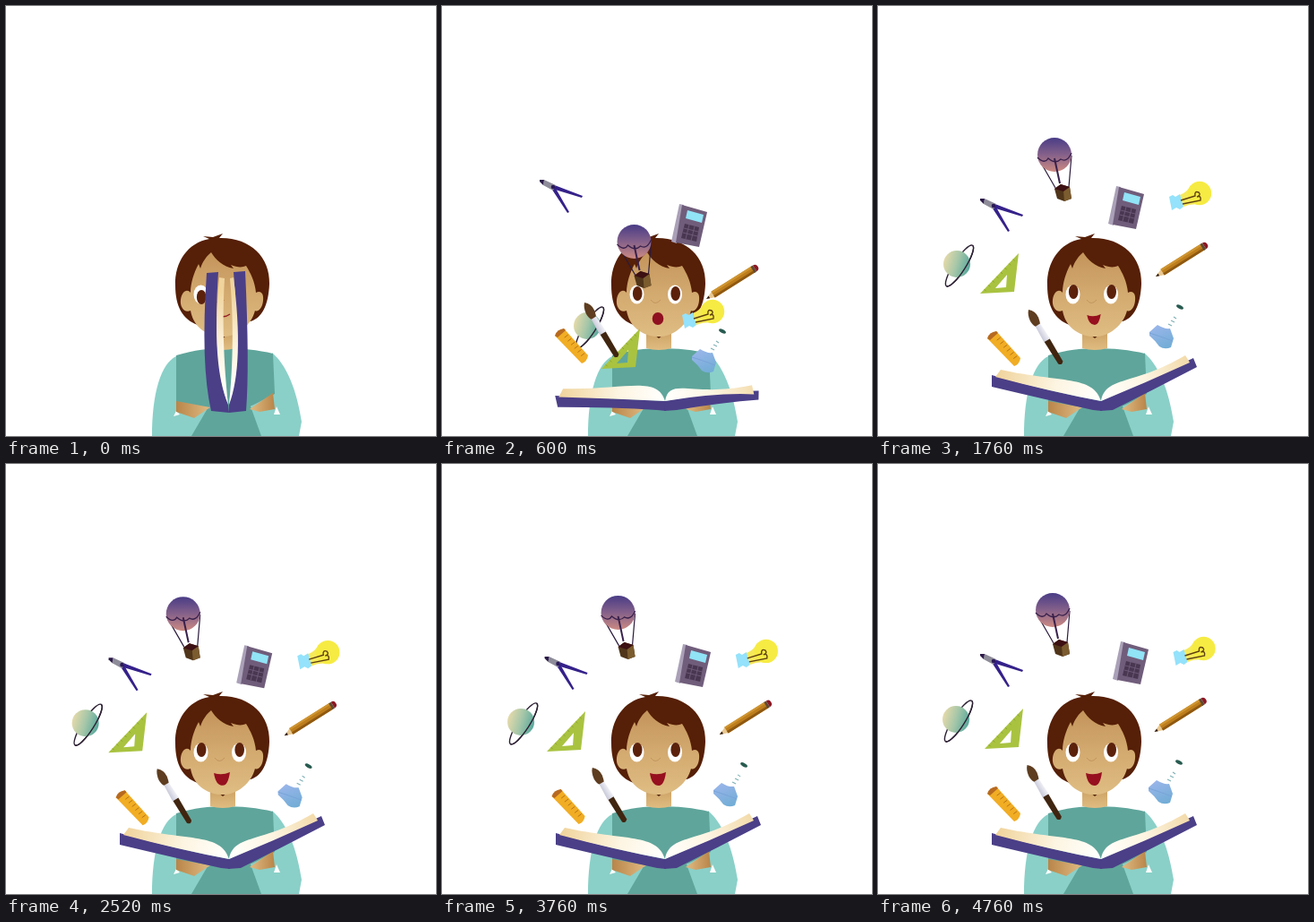
Animation, 480 px wide and 480 px high, one loop 4.8 s. Source, as an HTML page with a canvas:

```html
<!DOCTYPE html>
<html lang="en">
<head>
<meta charset="utf-8">
<title>Reading child</title>
<style>
html, body { margin: 0; width: 100%; height: 100%; overflow: hidden; background: #fff; }
canvas { display: block; width: 100vw; height: 100vh; }
</style>
</head>
<body>
<canvas id="stage" width="480" height="480"></canvas>
<script>
const ctx = document.getElementById('stage').getContext('2d');
const LOOP = 4800, STEP = 40;
const clamp = v => Math.max(0, Math.min(1, v));
const lerp = (a, b, k) => a + (b - a) * k;
const ease = v => { v = clamp(v); return v * v * (3 - 2 * v); };

function fill(path, color) {
  ctx.fillStyle = color;
  ctx.fill(new Path2D(path), 'evenodd');
}
function line(path, color, width = 1) {
  ctx.strokeStyle = color;
  ctx.lineWidth = width;
  ctx.stroke(new Path2D(path));
}
function oval(x, y, rx, ry, color, turn = 0) {
  ctx.beginPath();
  ctx.ellipse(x, y, rx, ry, turn, 0, 7);
  ctx.fillStyle = color;
  ctx.fill();
}
function blend(x0, y0, x1, y1, ...colors) {
  const g = ctx.createLinearGradient(x0, y0, x1, y1);
  colors.forEach((c, i) => g.addColorStop(i / (colors.length - 1), c));
  return g;
}
function turned(x, y, angle, draw) {
  ctx.save();
  ctx.translate(x, y);
  ctx.rotate(angle);
  draw();
  ctx.restore();
}

// Cubic curve through [time, value] pairs, flat at both ends.
function curve(keys, t) {
  const last = keys.length - 1;
  if (t <= keys[0][0]) return keys[0][1];
  if (t >= keys[last][0]) return keys[last][1];
  const i = keys.findIndex(k => k[0] > t) - 1;
  const slope = n => n <= 0 || n >= last ? 0
    : (keys[n + 1][1] - keys[n - 1][1]) / (keys[n + 1][0] - keys[n - 1][0]);
  const [t0, a] = keys[i], [t1, b] = keys[i + 1];
  const d = t1 - t0, u = (t - t0) / d, v = 1 - u;
  return v * v * (1 + 2 * u) * a + u * u * (3 - 2 * u) * b
    + d * u * v * (v * slope(i) - u * slope(i + 1));
}

// ---- child ----
function drawChild(t) {
  fill('M190 391C173 399 163 432 163 480H212L228 448L194 440Z', '#8ad0c8');
  fill('M297 387C317 404 326 438 330 464L327 480H281L272 448L299 430Z', '#8ad0c8');
  fill('M190 390C210 384 228 382 242 382C262 382 282 384 298 388L300 433L273 447L285 480H207L224 451L190 442Z', '#5fa59b');
  fill('M187 458L190 452L194 456ZM299 456L302 447L306 456Z', '#fff');
  fill('M190 441L228 448L210 460L190 453Z', blend(190, 0, 228, 0, '#b98549', '#e0bb83'));
  fill('M272 450L298 432L300 450L283 453Z', blend(272, 0, 300, 0, '#e0bb83', '#b98549'));
  fill('M228 358H256V382Q242 386 228 382Z', blend(0, 360, 0, 383, '#c99d60', '#dfbb80'));
  fill('M237 367H247L242 371Z', '#55260d');

  fill('M189 312C188 286 203 264 227 260L220 257L231 258L242 254L238 259C272 258 295 280 294 310C293 334 286 348 273 352L214 356C197 350 189 335 189 312Z', '#561f07');
  fill('M206 320C206 309 210 297 215 288L217 293C219 286 224 279 229 275C234 283 242 291 254 293L251 289C258 292 264 292 268 290C273 298 278 308 279 320C285 317 288 322 287 329C286 338 281 342 278 340C274 356 258 370 240 369C222 368 209 357 206 340C199 343 194 336 195 328C196 319 202 315 206 320Z',
    blend(0, 276, 0, 369, '#c4955c', '#d3aa70', '#dfbd83'));

  const lookY = curve([[0, 325], [420, 324], [600, 321], [800, 319]], t);
  for (const x of [217.5, 260]) {
    oval(x, 322, 8, 10.5, '#fff');
    oval(x + .7, lookY, 5.3, 8, '#5b210b');
  }
  line('M233 328Q238 335 244 328', '#bd9058', .8);

  if (t < 400) {
    line('M236 345Q243 349 250 344', '#921b24', 1.4);
  } else if (t < 1280) {
    const open = ease((t - 360) / 160);
    oval(241, 349, 6.3, 7 * open, '#8f1020');
  } else {
    const grow = ease((t - 1280) / 1400);
    const w = lerp(7.2, 9, grow), low = lerp(355, 359, grow);
    fill(`M${241 - w} 345Q241 348 ${241 + w} 344Q${239 + w} ${low} 242 ${low}Q${243 - w} ${low} ${241 - w} 345Z`, '#96101f');
  }
}

// ---- book: points swing around the spine, those next to it slide ----
const SPINE = [249, 446];
function swing(side, k, [cx, cy, ox, oy]) {
  const polar = (x, y) => [Math.hypot(x - SPINE[0], y - SPINE[1]),
    Math.atan2(SPINE[1] - y, (x - SPINE[0]) * side)];
  const [r0, a0] = polar(cx, cy), [r1, a1] = polar(ox, oy);
  if (r1 < 40) return [lerp(cx, ox, clamp(k)), lerp(cy, oy, clamp(k))];
  const r = lerp(r0, r1, k), a = lerp(a0, a1, k);
  return [SPINE[0] + side * r * Math.cos(a), SPINE[1] - r * Math.sin(a)];
}
// Each point: closed x, y, open x, y.
const HALVES = [
  { side: -1, over: 1.15,
    cover: [[237, 297, 127, 412], [224, 298, 127, 425], [217, 400, 190, 440], [229, 452, 240, 451],
      [249, 454, 250, 452], [248, 445, 249, 441], [230, 400, 195, 431]],
    page: [[244, 304, 137, 406], [238, 303, 131, 414], [229, 400, 195, 431], [248, 445, 249, 441],
      [246, 425, 240, 412], [240, 370, 205, 421]] },
  { side: 1, over: 1.3,
    cover: [[254, 297, 352, 393], [267, 296, 356, 403], [272, 400, 308, 428], [268, 452, 262, 451],
      [249, 454, 248, 452], [249, 445, 249, 441], [262, 400, 302, 417]],
    page: [[250, 304, 343, 390], [254, 303, 348, 398], [266, 400, 300, 420], [249, 445, 249, 441],
      [251, 425, 254, 413], [256, 370, 285, 424]] }
];
function drawBook(t) {
  const paper = ctx.createRadialGradient(249, 436, 8, 249, 436, 118);
  paper.addColorStop(0, '#fffefa');
  paper.addColorStop(.4, '#fdf5e2');
  paper.addColorStop(1, '#f0d49d');
  const shapes = HALVES.map(h => {
    const k = t < 600 ? h.over * ease(t / 580) : lerp(h.over, 1, ease((t - 600) / 280));
    const place = p => swing(h.side, k, p).map(v => v.toFixed(2)).join(' ');
    return { c: h.cover.map(place), p: h.page.map(place) };
  });
  for (const { c } of shapes)
    fill(`M${c[0]}L${c[1]}Q${c[2]} ${c[3]}L${c[4]}L${c[5]}Q${c[6]} ${c[0]}Z`, '#4b3f88');
  for (const { p } of shapes)
    fill(`M${p[0]}L${p[1]}Q${p[2]} ${p[3]}C${p[4]} ${p[5]} ${p[0]}Z`, paper);
}

// ---- flying things, drawn at their resting places ----
function balloon() {
  line('M179 170L198 203M216 167L213 202', '#2b1b3d', 1.2);
  oval(197, 166, 19, 19, blend(0, 147, 0, 185, '#493c86', '#85618a', '#cc8a82'));
  line('M178 169Q186 177 190 170Q198 177 204 171Q211 175 216 164', '#38204c', 1.3);
  line('M197 170L203 198', '#38204c', 2);
  fill('M197 204L204 199L214 202L216 215L208 218L200 215Z', '#50351a');
  fill('M207 206L214 202L216 215L208 218Z', '#7b5c2f');
  fill('M197 204L204 199L214 202L207 207Z', '#3d1013');
}
function calculator() {
  fill('M266 201L271 202L263 245L257 243Z', '#aaa0b7');
  fill('M269 202L297 210L288 249L262 244Z', '#705d7b');
  fill('M275 208L293 213L291 222L273 217Z', '#91e3f6');
  fill('M272 223L288 227L285 243L268 239Z', '#493651');
  line('M277 224L273 240M283 226L279 242M271 228L287 232M270 233L286 237', '#705d7b', .9);
}
function bulb() {
  fill('M337 211Q345 208 349 200L361 222Q350 220 341 224Z', '#f6e95a');
  oval(359, 209, 13.2, 13.2, '#f6eb43');
  fill('M325 213L329 211L332 213L337 210L341 224L337 227L333 225L328 228Z', '#94e2fb');
  line('M338 217L354 212Q353 206 358 208Q361 211 356 213Q361 211 360 217L340 221', '#5e3f12', 1.4);
}
function pencil() {
  turned(310, 302, -.562, () => {
    fill('M0 0L10 -4V4Z', '#e9c891');
    fill('M0 0L4 -1.6V1.6Z', '#2d1a10');
    fill('M9 -4H62V4H9Z', '#bd7d1c');
    fill('M9 1.2H62V4H9Z', '#8f5911');
    fill('M9 -4H62V-1.8H9Z', '#cf9531');
    fill('M61 -4H64V4H61Z', '#5f4a32');
    fill('M64 -4Q68 -4 68 0Q68 4 64 4Z', '#8b1723');
  });
}
function flask() {
  fill('M303 364L312 356Q320 361 326 360L330 371L327 381Q320 384 314 380Q309 373 303 368Z',
    blend(312, 357, 322, 382, '#98b5e9', '#72add6'));
  line('M303 365Q313 368 329 374', '#79a4d8', 1);
  line('M324 355L328 357M327 351L331 353M330 347L333 349', '#7fb1b5', 1.1);
  oval(337, 336, 4.3, 2, '#285b50', .5);
}
function compass() {
  fill('M128 220L162 233L161 235L128 225Z', '#35218a');
  fill('M126 223L131 223L147 251L145 252Z', '#35218a');
  fill('M119 215L132 221L129 227L118 221Z', '#8d8c98');
  fill('M114 215L119 215L118 221L114 217Z', '#2b1a48');
  oval(129, 223, 2.3, 2.3, '#2b1a58');
}
function planet() {
  const ring = (from, to) => {
    ctx.beginPath();
    ctx.ellipse(91, 290, 27, 6.5, -1, from, to);
    ctx.strokeStyle = '#2c2033';
    ctx.lineWidth = 1.4;
    ctx.stroke();
  };
  ring(0, 7);
  oval(88, 288, 15, 15, blend(74, 284, 102, 292, '#e2d9aa', '#a5c6a8', '#5ba99d'));
  ring(0, Math.PI);
}
function triangle() {
  fill('M114 321L157 276L152 319ZM131 315L144 300L143 314Z', '#a9c340');
  let ticks = '';
  for (let i = 1; i < 9; i++) ticks += `M${114 + i * 4.6} ${321 - i * 4.8}l2 2`;
  line(ticks, '#839c2a', .8);
}
function ruler() {
  fill('M122 371L132 363L159 393Q158 400 152 402Z', '#f1ad24');
  fill('M122 371Q124 364 132 363L134 365L125 373Z', '#b76a20');
  let ticks = '';
  for (let i = 1; i < 7; i++) ticks += `M${133 + i * 3.7} ${366 + i * 4.1}l-4 3`;
  line(ticks, '#b87516', 1);
}
function brush() {
  turned(168, 339, 1.026, () => {
    fill('M39 -3.5L69 -3Q73 0 69 3L39 3.5Z', '#402510');
    fill('M18 -3L40 -4V4L18 3Z', blend(0, -4, 0, 4, '#f2f2f7', '#c7c8d8'));
    fill('M0 0Q5 -6 13 -5Q18 -4 20 -3V3Q18 5 12 5Q4 4 0 0Z', '#5e3d20');
  });
}

// [drawing, launch time, early x, y, overshoot x, y, rest x, y, late drift]
const THINGS = [
  [planet, 440, 162, 357, 79, 274, 88, 288, -1],
  [triangle, 480, 202, 384, 129, 284, 138, 300, 5],
  [ruler, 320, 145, 380, 140, 377, 141, 383, 0],
  [brush, 300, 178, 362, 186, 371, 187, 370, -1.5],
  [compass, 280, 133, 211, 141, 228, 138, 232, 0],
  [balloon, 400, 214.5, 263, 193, 157, 197, 166, -2],
  [calculator, 320, 276, 245, 280, 218, 277, 225, 5],
  [pencil, 340, 323, 309, 336, 285, 338, 284, -1.5],
  [bulb, 440, 302, 341, 373, 181, 359, 209, 4.5],
  [flask, 480, 293, 396, 331, 352, 317, 369, -1]
];
const HOME = [248, 428];
function drawThing([draw, start, x1, y1, x2, y2, x, y, drift], t) {
  if (t < start) return;
  const path = (from, a, b, rest, mid, late, end) => curve([[start, from], [600, a], [920, b],
    [1140, rest], [1760, rest], [3280, rest + mid], [4200, rest + late], [4760, rest + end]], t);
  const size = lerp(.2, 1, ease((t - start) / 110));
  ctx.save();
  ctx.translate(path(HOME[0], x1, x2, x, 1, drift, drift), path(HOME[1], y1, y2, y, 1.7, -2.2, -3));
  ctx.scale(size, size);
  ctx.translate(-x, -y);
  draw();
  ctx.restore();
}

function frame(now) {
  const t = Math.floor(now % LOOP / STEP) * STEP;
  ctx.fillStyle = '#fff';
  ctx.fillRect(0, 0, 480, 480);
  drawChild(t);
  for (const thing of THINGS) drawThing(thing, t);
  drawBook(t);
}
const begin = performance.now();
function tick() {
  frame(performance.now() - begin);
  requestAnimationFrame(tick);
}
tick();
</script>
</body>
</html>
```
